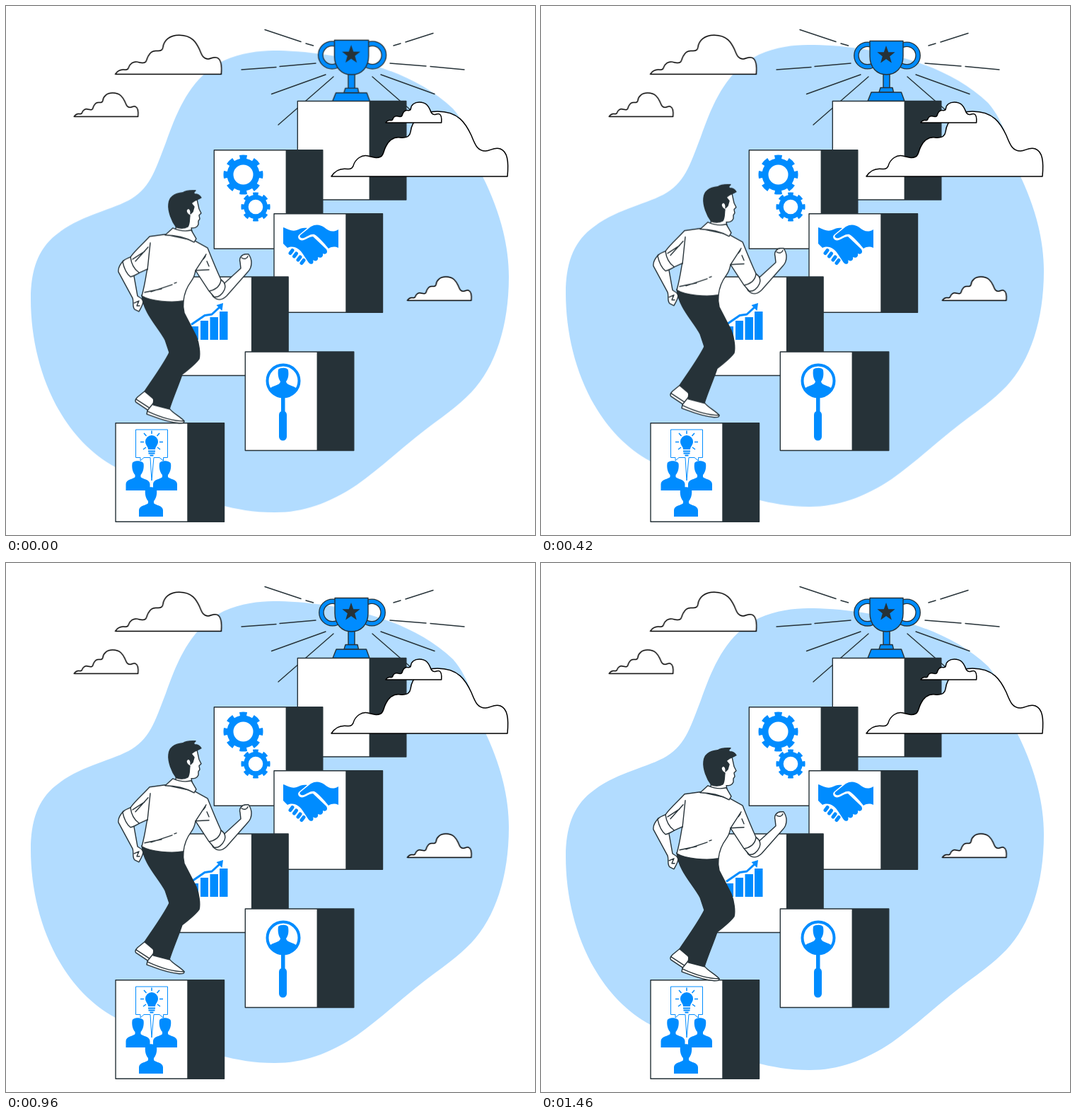
Write an HTML page that moves like this. It is 748x748 px and loops after 1.5 s.

```html
<!DOCTYPE html>
<html lang="en">
<head>
<meta charset="utf-8">
<title>Climbing to the trophy</title>
<style>
  html, body { margin: 0; width: 100%; height: 100%; overflow: hidden; background: #fff; }
  svg { display: block; width: 100vw; height: 100vh; --ink: #263238; --blue: #008cff; }
  .float, .beat { animation: float 1500ms linear -40ms infinite; }
  .beat { animation-name: beat; transform-origin: 488.5px 91.5px; }
  @keyframes float { 50% { transform: translateY(-14.96px); } }
  @keyframes beat {
    0%, 30%, 40%, 60%, 100% { transform: scale(1); }
    10%, 50% { transform: scale(1.1); }
  }
  .line { fill: none; stroke: var(--ink); stroke-width: 1.4; stroke-linecap: round; stroke-linejoin: round; }
  .white { fill: #fff; }
  .ink { fill: var(--ink); }
  .blue { fill: var(--blue); }
  .pen { fill: none; stroke: var(--blue); }
  #cloud { fill: #fff; stroke: #000; stroke-width: 1.5; stroke-linejoin: round; vector-effect: non-scaling-stroke; }
</style>
</head>
<body>
<svg viewBox="0 0 748 748">
  <defs>
    <path id="cloud" d="M0 0C5-8 13-12 23-10.5C28-10 30-12 31-15C34-25 43-31 52-29C60-27 64-25 70-28C74-30 74-37 77-42C82-52 88-56 97-55C106-54 111-56 112-63C114-80 128-92 150-92C180-92 190-75 198-58C203-46 206-36 218-36C225-36 230-42 239-39C249-35 251-22 249 0Z"/>
    <path id="person" d="M-8 4C-7-1 6-1 8 4C9 10 7 17 4 20V23C6 26 17 26 17 33V42H-17V33C-17 26-6 26-4 23V20C-7 17-9 10-8 4Z"/>
    <g id="box">
      <path class="white" d="M0 0H102V139.5H0Z"/>
      <path class="ink" d="M101.3 0H153.5V139.5H101.3Z"/>
      <path class="line" d="M0 0H153.5V139.5H0Z"/>
    </g>
    <g id="gear" class="pen">
      <circle r="18.5" stroke-width="9"/>
      <circle r="25" stroke-width="6" pathLength="80" stroke-dasharray="5.2 4.8" stroke-dashoffset="2.6"/>
    </g>
    <g id="handle" fill="none">
      <circle r="15.8" stroke="#263238" stroke-width="7.6"/>
      <circle r="15.8" stroke="#008cff" stroke-width="5"/>
    </g>
  </defs>

  <path class="float" fill="#b2dcff" d="M378 64C440 64 560 78 632 146C656 173 664 212 674 242C697 288 711 336 711 384C711 453 692 511 658 547C633 573 604 590 579 611C548 636 523 659 496 678C457 704 420 717 380 717C350 717 325 712 305 707C250 694 200 678 155 653C75 610 35 510 35 415C35 375 45 345 70 325C105 296 150 290 178 273C205 257 213 227 226 194C242 150 260 102 308 78C332 67 358 64 378 64Z"/>

  <path class="line" d="M366 33.5L417 50.5M424 53L434.5 56M333 90L382 86.5M387 85.5L438 81M375.5 124.5L452 97M385 168L463 100M604 38.5L565 51M558 53L548 56M543 81L594 85M600 85.5L648 90M530 97L606 124.5M518 100L595 167"/>

  <g class="beat">
    <use href="#handle" x="461.7" y="70"/>
    <use href="#handle" x="517.3" y="70"/>
    <g class="line" style="fill: var(--blue)">
      <path d="M484 95H493V116H484Z"/>
      <path d="M480 115.5H497L498.5 122H478Z"/>
      <path d="M467 122H509.5L514 134.5H462Z"/>
      <path d="M465 49.5H512V71C512 87 502 97 488.5 97C475 97 465 87 465 71Z"/>
    </g>
    <path class="ink" d="M488 56L491.2 65.3H500.6L493.2 71.2L495.8 80.4L488 75L480.2 80.4L482.8 71.2L475.4 65.3H484.8Z"/>
  </g>

  <use href="#box" x="412.3" y="134.5"/>

  <use href="#box" x="294.3" y="203.7"/>
  <use href="#gear" transform="translate(335.5 238.5)"/>
  <use href="#gear" transform="translate(353 284) scale(.735)"/>

  <use href="#box" x="379" y="293.7"/>
  <g class="blue">
    <path d="M392 313C400 316 404 319 411 317C417 314 421 313 426 314L414 324C411 328 416 333 421 331C426 329 430 326 434 326L453 344C456 349 452 352 448 350C449 355 445 357 441 355C442 360 438 362 434 359C436 364 432 367 428 363L420 351C415 343 407 338 398 342L392 336Z"/>
    <path stroke="#fff" stroke-width="2.4" paint-order="stroke" d="M470 316C462 321 456 318 450 313C444 309 438 308 431 312L416 324C414 327 418 329 421 328C427 326 430 322 436 323C440 325 450 335 456 343C461 340 465 340 470 342Z"/>
    <path class="pen" stroke-width="5" stroke-linecap="round" d="M405 345.5l-3 4M410.5 350l-3 4M416 355l-3 4M421 359.5l-3 4"/>
  </g>

  <use href="#box" x="245.6" y="383"/>
  <path class="blue" d="M261 453H272V472H261ZM275 445H286V472H275ZM288.5 440H300V472H288.5ZM302 432H313.5V472H302ZM307 420L305.5 431L297.5 423Z"/>
  <path class="pen" stroke-width="3" stroke-linejoin="round" d="M262 450.5L281 437.5L291 436L303 425"/>

  <use href="#box" x="338.3" y="489"/>
  <circle class="pen" cx="392" cy="530" r="22.5" stroke-width="4"/>
  <path class="blue" d="M372 542C377 536 387 537 388 531C385 527 384 520 385 514C388 511 398 511 399 515C400 522 399 527 396 531C397 537 407 536 412 542A23 23 0 0 1 372 542ZM389 553H394.5V574H389Z"/>
  <path class="pen" stroke-width="11" stroke-linecap="round" d="M391.5 578V609"/>

  <use href="#box" x="155" y="589.7"/>
  <g class="blue">
    <path class="pen" d="M183.5 599H228.5V638.5H222.5V643L217 638.5H209L206 671L204 638.5H195L190 643V638.5H183.5Z"/>
    <path d="M197 616A9 9 0 1 1 215 616C215 621 211 623 211 627H201C201 623 197 621 197 616Z"/>
    <path class="pen" stroke-width="1.8" d="M201 629.5H211M201.5 632.5H210.5M203.5 635.5H208.5"/>
    <path class="pen" stroke-width="1.5" d="M206 600.5V605M195 604L198.5 608M217 604L213.5 608M190 616.5H195M217 616.5H222M194 627L198 624M218 627L214 624"/>
    <use href="#person" x="186.5" y="643"/>
    <use href="#person" x="225" y="643"/>
    <use href="#person" x="205" y="680"/>
  </g>

  <g class="float">
    <g class="line" transform="translate(0 .8)">
      <path class="white" d="M197 544L186 553C183 556 182 558 183.5 560L206 575L211 567L208 554Z"/>
      <path d="M184 556L207 571"/>
      <path class="white" d="M208 562L231 569C236 576 247 581 252 587C252 590 250 590 245 590C225 588 210 581 199 577L200 572Z"/>
      <path d="M200 573C215 580 235 587 252 587"/>
      <path class="white" d="M166 360C162 365 158 370 159 376L179 413C181 419 178 425 182 429L188 432C190 428 193 424 194 418C193 413 188 412 186 410L181 382Z"/>
      <path d="M181 420L188 417L185 424L189 424"/>
      <path class="ink" d="M192 409C205 418 235 420 251 417C250 424 251 430 252 434L269 467C273 477 275 492 273 499C268 506 258 514 249 521C244 536 236 554 231 570L208 564L209 556L196 545C206 530 224 505 231 490L225 472C214 452 195 435 192 409Z"/>
      <path class="white" d="M262 276L270 273L273 287L276 293L273 296L274 301L272 304L272 309C270 314 266 314 262 314L264 323L239 321L241 308Z"/>
      <path class="ink" d="M241 313C234 304 229 290 230 280C231 268 241 265 250 264C256 260 264 261 268 261C265 263 265 265 267 266C271 266 274 268 276 271C272 274 268 274 266 276L262 279L266 284L264 291L261 294C262 287 257 284 255 289C255 294 258 295 260 296C259 303 260 308 257 312C252 315 247 315 241 313Z"/>
      <path class="white" d="M302 388L309 392L332 371L331 362C329 356 334 351 339 351L343 351C346 355 347 359 347 363C347 370 345 373 342 376L312 410C306 416 299 417 293 411L288 402Z"/>
      <path d="M333 356C337 359 341 357 342 354"/>
      <path class="white" d="M203 326L225 323L267 332L285 342C291 357 298 374 304 387C310 391 311 397 309 401C306 408 300 413 294 411L287 403L268 374C267 380 265 385 262 389C256 397 252 406 251 417C235 420 205 418 192 410C198 388 199 372 200 372L189 377C184 380 180 382 176 383C170 378 167 371 165 362C167 358 172 357 176 355C183 345 194 336 203 326Z"/>
      <path class="white" d="M225 324L236 314C245 318 254 319 262 317L269 329L266 334C255 328 240 324 225 324Z"/>
      <path d="M204 335L200 373M176 355C177 363 181 372 188 377M304 387C303 396 296 401 288 403"/>
      <path d="M179 358L196 347M183 361L201 341M268 374L283 351M268 374L287 373M279 358L282 354M284 361L287 368M196 405L220 400M205 404L235 394M238 392L241 391"/>
    </g>
  </g>

  <use href="#cloud" transform="translate(154.5 96.5) scale(.602)"/>
  <use href="#cloud" transform="translate(96.3 156.3) scale(.363)"/>
  <use href="#cloud" transform="translate(567.5 416.3) scale(.363)"/>
  <use href="#cloud" transform="translate(460 241)"/>
  <use href="#cloud" transform="translate(537 165) scale(.316)"/>
</svg>
</body>
</html>
```
